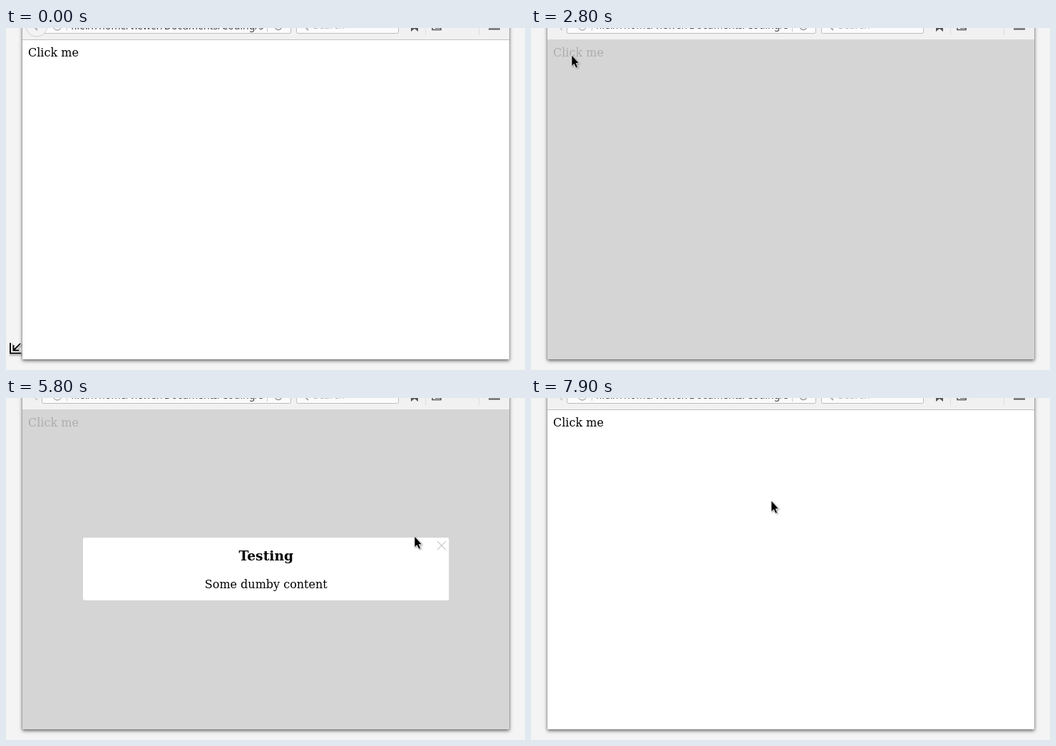
These frames come from a looping animation (728 by 480 pixels, 8 s). An HTML page:

```html
<!DOCTYPE html>
<html lang="en">
<head>
<meta charset="utf-8">
<title>Modal dialog demo</title>
<style>
  html, body { margin: 0; width: 100%; height: 100%; overflow: hidden; background: #f4f4f4; }
  #stage { position: relative; width: 728px; height: 480px; overflow: hidden; }
  #window {
    position: absolute; left: 23px; top: -60px; width: 683px; height: 525px;
    background: #fff; box-shadow: 0 0 1px #666, 0 2px 5px rgba(0, 0, 0, .6);
  }
  svg { position: absolute; left: 0; top: 0; }
  svg svg { overflow: hidden; }
  .serif { font: 16px "DejaVu Serif", serif; }
  .title { font: bold 18.72px "DejaVu Serif", serif; }
  .ui { font: 14px "Noto Sans", sans-serif; }
  .line { fill: none; stroke: #555; }
  .field { fill: #fbfbfb; stroke: #bdbdbd; }
  .cursor { filter: drop-shadow(1px 1px 1px rgba(0, 0, 0, .4)); }
</style>
</head>
<body>
<div id="stage">
  <div id="window"></div>
  <svg width="728" height="480">
    <g id="toolbar">
      <rect x="23" width="683" height="16" fill="#f1f1f1"/>
      <path d="M23 16.5H706" stroke="#c2c2c2"/>
      <rect class="field" x="50.5" y="-20.5" width="349" height="28" rx="2"/>
      <rect class="field" x="407.5" y="-20.5" width="143" height="28" rx="2"/>
      <circle id="backRing" cx="43" cy="-3" r="15" fill="#f3f3f3" stroke="#d0d0d0"/>
      <path id="backArrow" d="M44-7L39-2L44 3M39-2H49" class="line" stroke-width="2" style="stroke:#aaa"/>
      <circle class="line" cx="72" cy="-3" r="6" style="stroke:#888"/>
      <path d="M85.5 0V4M366.5 0V5" stroke="#c8c8c8"/>
      <path d="M588.5 0V10M663.5 0V10" stroke="#dcdcdc"/>
      <text id="address" class="ui" x="91" y="1.5" fill="#444">file:///home/viewer/Documents/Coding/s</text>
      <circle class="line" cx="382" cy="-2" r="4.5" style="stroke:#999" stroke-width="1.5"/>
      <path d="M420-1L424 3" stroke="#aaa" stroke-width="2"/>
      <text class="ui" x="431" y="1" fill="#aaa">Search</text>
      <path d="M568-6H578V5L573 1L568 5Z" fill="#555"/>
      <path class="line" d="M598-6V2.5H610V-6M602 0H610" stroke-width="1.6"/>
      <path d="M677 1.5H693" stroke="#555" stroke-width="2"/>
    </g>
    <text class="serif" x="31" y="40">Click me</text>
    <g id="overlay">
      <rect x="23" y="16" width="683" height="449" fill="#d5d5d5"/>
      <text class="serif" x="31" y="40" fill="#adadad">Click me</text>
      <svg id="modal" x="108" y="196" height="88">
        <rect width="100%" height="100%" rx="3" fill="#fff"/>
        <text class="title" y="32" text-anchor="middle">Testing</text>
        <text class="serif" y="71" text-anchor="middle">Some dumby content</text>
        <path id="close" d="M-6-6L6 6M6-6L-6 6" fill="none" stroke-width="1.2"/>
      </svg>
    </g>
    <g id="pointer" class="cursor">
      <path id="arrow" d="M0 0V15.5L3.5 12.5L6 18L8.5 17L6.2 11.5H10.5Z" stroke="#fff" stroke-width=".7"/>
      <g id="beam" fill="none">
        <path d="M-4-8H4M0-8V8M-4 8H4" stroke="#fff" stroke-width="3"/>
        <path d="M-4-8H4M0-8V8M-4 8H4" stroke="#000" stroke-width="1.2"/>
      </g>
      <g id="resize" fill="none">
        <path id="resizeShape" d="M-2-14V0.5H13M12-13L3-4M2.5-11V-3.5H10" stroke="#fff" stroke-width="4"/>
        <path d="M-2-14V0.5H13M12-13L3-4M2.5-11V-3.5H10" stroke="#000" stroke-width="2"/>
      </g>
    </g>
  </svg>
</div>
<script>
const LOOP = 8000, STEP = 100, MODAL_WIDTH = 513.5;
const OPEN_AT = 2812, CLOSE_AT = 6470, GROW_TIME = 800;
const $ = id => document.getElementById(id);

// Pointer waypoints: time, x, y
const path = [
  [0, 8, 456], [300, 42, 410], [900, 84, 152], [1200, 75, 97], [1400, 75, 97],
  [2000, 56, 40], [2100, 56, 40], [2300, 57, 38], [3800, 57, 38],
  [4700, 486, 163], [4800, 497, 169], [5200, 497, 169],
  [6100, 611, 207], [7700, 611, 207], [7900, 337, 144], [LOOP, 337, 144]
];

function pointerAt(t) {
  const i = path.findIndex(p => p[0] > t);
  const [t0, x0, y0] = path[i - 1], [t1, x1, y1] = path[i];
  const k = (t - t0) / (t1 - t0);
  return [x0 + (x1 - x0) * k, y0 + (y1 - y0) * k];
}

// CSS "ease": cubic-bezier(.25, .1, .25, 1)
function ease(x) {
  if (x <= 0 || x >= 1) return x <= 0 ? 0 : 1;
  const bezier = (a, b, s) => 3 * a * s * (1 - s) ** 2 + 3 * b * s * s * (1 - s) + s ** 3;
  let low = 0, high = 1;
  for (let i = 0; i < 24; i++) {
    const mid = (low + high) / 2;
    if (bezier(.25, .25, mid) < x) low = mid; else high = mid;
  }
  return bezier(.1, 1, low);
}

function show(id, visible) {
  $(id).style.display = visible ? "" : "none";
}

function drawModal(t, hovered) {
  const grown = ease((t - OPEN_AT) / GROW_TIME) - ease((t - CLOSE_AT) / GROW_TIME);
  const width = Math.max(0, MODAL_WIDTH * grown);
  $("modal").setAttribute("width", width);
  const [title, body] = $("modal").querySelectorAll("text");
  title.setAttribute("x", Math.max(width / 2, 39));
  body.setAttribute("x", Math.max(width / 2, 85));
  $("close").setAttribute("transform", `translate(${width - 10.5} 11)`);
  $("close").setAttribute("stroke", hovered ? "#808080" : "#cbcbcb");
}

function draw(now) {
  const t = Math.floor(now % LOOP / STEP) * STEP;
  const [x, y] = pointerAt(t);
  const open = t >= 2800 && t < 7300;
  const resizing = t < 100;
  const overText = !open && x > 31 && x < 101 && y > 24 && y < 44;

  show("overlay", open);
  if (open) drawModal(t, x > 604 && y > 200);

  show("backRing", resizing);
  $("backArrow").style.opacity = resizing ? 1 : .5;
  $("address").setAttribute("y", resizing ? 2 : 1);

  $("pointer").setAttribute("transform", `translate(${Math.round(x)} ${Math.round(y)})`);
  show("resize", resizing);
  show("beam", overText);
  show("arrow", !resizing && !overText);
}

function tick() {
  draw(performance.now());
  requestAnimationFrame(tick);
}
tick();
</script>
</body>
</html>
```
